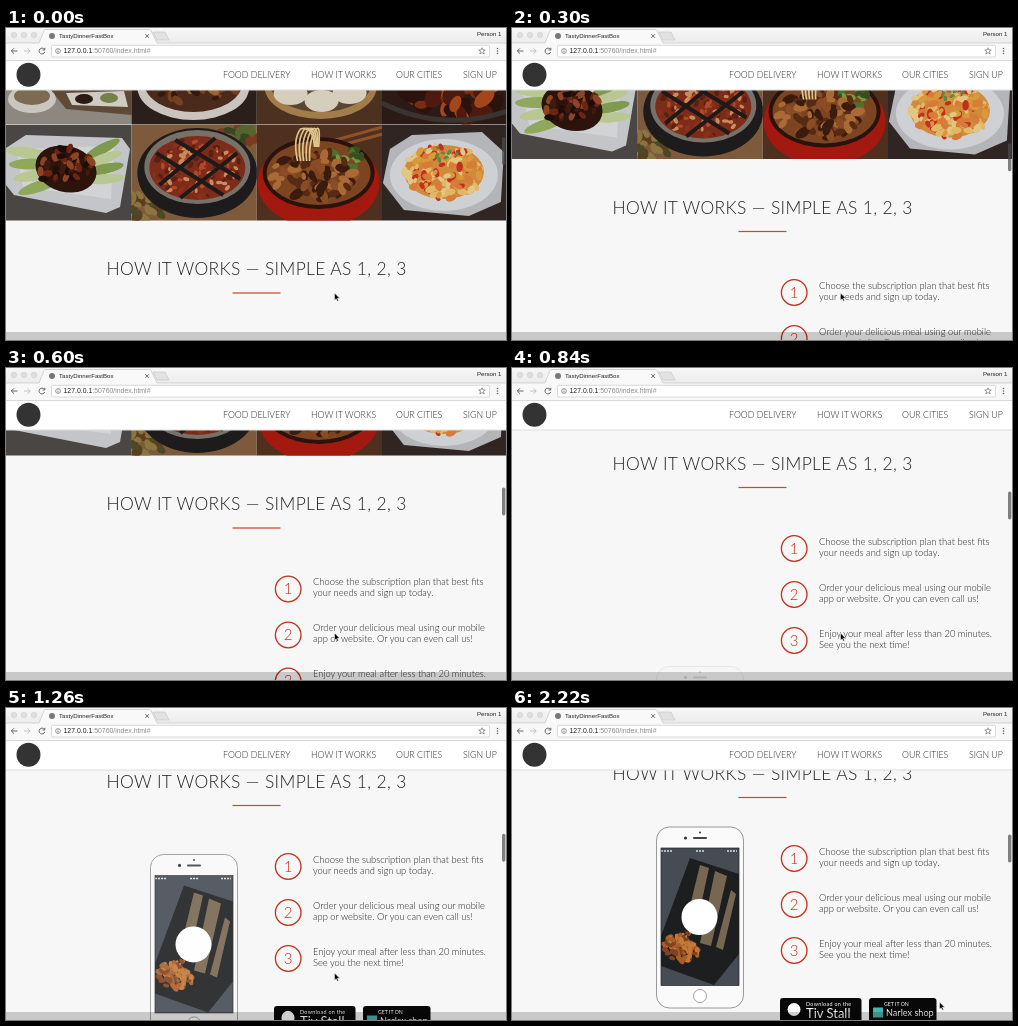
An HTML page that plays this animation: 500x312 px, repeating every 2.28 s.

```html
<!DOCTYPE html>
<html lang="en">
<head>
<meta charset="utf-8">
<title>Food delivery page</title>
<style>
html, body { margin: 0; width: 100%; height: 100%; overflow: hidden; background: #f7f7f7; }
svg { display: block; width: 100vw; height: 100vh; }
text { font-family: Lato, sans-serif; font-weight: 300; fill: #222; white-space: pre; }
.ui text { font-family: "Liberation Sans", Arial, sans-serif; font-weight: 400; }
.nav { font-size: 8.75px; }
.title { font-size: 17.4px; letter-spacing: .38px; text-anchor: middle; }
.copy { font-size: 9.35px; }
.num { font-size: 15px; text-anchor: middle; fill: #c0301a; }
.badge text { fill: #fff; font-weight: 400; }
</style>
</head>
<body>
<svg viewBox="0 0 500 312">
  <defs>
    <clipPath id="cell"><rect width="125.5" height="95.5"/></clipPath>
    <clipPath id="screen"><rect x="149" y="140" width="78" height="137.5"/></clipPath>
    <linearGradient id="tabs" x2="0" y2="1"><stop stop-color="#f6f6f6"/><stop offset="1" stop-color="#ebebeb"/></linearGradient>
  </defs>

  <g id="page">
    <g id="photos"></g>
    <text class="title" x="250.7" y="247">HOW IT WORKS — SIMPLE AS 1, 2, 3</text>
    <rect x="226.5" y="264.4" width="48" height="1.2" fill="#d0452c"/>
    <g id="steps"></g>
    <g class="badge">
      <rect x="268" y="465.5" width="81.5" height="24" rx="3" fill="#080808"/>
      <circle cx="282" cy="477" r="6.5" fill="#fff"/>
      <text x="294" y="473.5" font-size="5.4" letter-spacing=".3">Download on the</text>
      <text x="294" y="485" font-size="13">Tiv Stall</text>
      <rect x="357" y="465.5" width="67.5" height="24" rx="3" fill="#080808"/>
      <rect x="361" y="475" width="10" height="10" fill="#45b5b0"/>
      <text x="372" y="473" font-size="5.2">GET IT ON</text>
      <text x="374" y="483.5" font-size="9.1">Narlex shop</text>
    </g>
    <g id="phone">
      <rect x="144.5" y="119" width="87" height="181" rx="13" fill="#fafafa" stroke="#999"/>
      <circle cx="188" cy="124.5" r="1" fill="#333"/>
      <circle cx="173.5" cy="130" r="1.6" fill="#333"/>
      <rect x="181" y="129" width="14" height="2" rx="1" fill="#444"/>
      <circle cx="188" cy="288" r="6.5" fill="#fff" stroke="#888" stroke-width=".8"/>
      <g clip-path="url(#screen)">
        <rect x="149" y="140" width="78" height="138" fill="#464b54"/>
        <path d="M178 150L227 166V246L202 277L149 258V228Z" fill="#1d1e20"/>
        <path d="M188 157L197 160L187 206L177 202ZM203 163L215 168L199 238L188 235ZM219 182L224 186L211 242L204 239Z" fill="#776650"/>
        <g id="rice"></g>
        <path d="M149 143H160M184 143H193M215 143H225" stroke="#ddd" stroke-width="1.5" stroke-dasharray="2 1"/>
        <circle cx="187.5" cy="209" r="18" fill="#fff"/>
      </g>
      <rect x="149" y="140" width="78" height="137.5" fill="none" stroke="#222" stroke-width=".7"/>
    </g>
  </g>

  <rect id="thumb" x="496" width="3.4" height="28" rx="1.7" fill="#4c4c4c" opacity=".7"/>
  <rect y="304" width="500" height="8" fill="#000" opacity=".19"/>

  <rect y="32" width="500" height="30" fill="#fff"/>
  <rect y="61.5" width="500" height="1" fill="#ddd"/>
  <circle cx="22.5" cy="46.8" r="12" fill="#333"/>
  <g class="nav">
    <text x="217" y="50">FOOD DELIVERY</text>
    <text x="305" y="50">HOW IT WORKS</text>
    <text x="390" y="50">OUR CITIES</text>
    <text x="457" y="50">SIGN UP</text>
  </g>

  <g class="ui">
    <rect width="500" height="16" fill="url(#tabs)"/>
    <g fill="#dedede" stroke="#ccc" stroke-width=".5">
      <circle cx="8" cy="7" r="2.8"/><circle cx="18" cy="7" r="2.8"/><circle cx="28" cy="7" r="2.8"/>
    </g>
    <rect y="15" width="500" height="17.5" fill="#f8f8f8"/>
    <path d="M0 15H33L38 2.5Q38.5 1.5 40 1.5H143Q144.5 1.5 145 2.5L151 15H500" fill="#f9f9f9" stroke="#c4c4c4" stroke-width=".7"/>
    <path d="M147 4H159L163 12H151Z" fill="#e2e2e2" stroke="#c4c4c4" stroke-width=".6"/>
    <circle cx="46" cy="8" r="3" fill="#777"/>
    <text x="53" y="10" font-size="6.1">TastyDinnerFastBox</text>
    <path d="M139.3 6.2L143 9.9M143 6.2L139.3 9.9" stroke="#444" stroke-width=".8"/>
    <text x="471" y="8.2" font-size="6.1">Person 1</text>
    <rect x="45.5" y="17.3" width="438" height="11.7" rx="1.5" fill="#fff" stroke="#ccc" stroke-width=".7"/>
    <g fill="none" stroke="#555" stroke-width=".9">
      <path d="M11.5 23H5.5M8 20.3L5.3 23L8 25.7"/>
      <path d="M18 23H24M21.5 20.3L24.2 23L21.5 25.7" stroke="#bbb"/>
      <path d="M38.3 21.3A2.9 2.9 0 1 0 38.7 24M38.8 19.8V22H36.6"/>
      <circle cx="52" cy="23" r="2.4" stroke-width=".6"/>
      <path d="M52 22.5V24.5M52 21.3V21.9" stroke-width=".7"/>
      <path d="M476 19.8L477 22H479.3L477.5 23.5L478.2 25.9L476 24.5L473.8 25.9L474.5 23.5L472.7 22H475Z" stroke-width=".6"/>
    </g>
    <text x="57.5" y="25.3" font-size="6.9">127.0.0.1<tspan fill="#8a8a8a">:50760/index.html#</tspan></text>
    <g fill="#666"><circle cx="491.5" cy="20.5" r=".8"/><circle cx="491.5" cy="23" r=".8"/><circle cx="491.5" cy="25.5" r=".8"/></g>
    <path d="M0 32.5H500" stroke="#ccc" stroke-width=".7"/>
  </g>

  <path id="cursor" d="M0 0V7.2L1.7 5.7L2.8 8.2L4 7.7L2.9 5.3H5.2Z" fill="#000" stroke="#fff" stroke-width=".5"/>
</svg>
<script>
const $ = id => document.getElementById(id);
let seed = 7;
const rnd = () => (seed = seed * 16807 % 2147483647) / 2147483647;

const oval = (x, y, rx, ry, fill, turn = 0) =>
  `<ellipse cx="${x}" cy="${y}" rx="${rx}" ry="${ry}" fill="${fill}" transform="rotate(${turn} ${x} ${y})"/>`;
const shape = (d, fill) => `<path d="${d}" fill="${fill}"/>`;
const line = (d, color, width) => `<path d="${d}" fill="none" stroke="${color}" stroke-width="${width}"/>`;

// Scatter small pieces of food inside an ellipse
function bits(x, y, rx, ry, count, size, colors) {
  let out = '';
  for (let i = 0; i < count; i++) {
    const a = rnd() * 6.283, r = Math.sqrt(rnd()), s = size * (.6 + rnd() * .7);
    out += oval(x + Math.cos(a) * r * rx, y + Math.sin(a) * r * ry, s, s * .6,
      colors[i % colors.length], rnd() * 180);
  }
  return out;
}

function photo(col, row, back, art) {
  return `<g transform="translate(${col * 125.3} ${1 + row * 96})" clip-path="url(#cell)">
    <rect width="126" height="96" fill="${back}"/>${art}</g>`;
}

const greens = [0, 1, 2, 3].map(i =>
  oval(22 + i * 4, 28 + i * 11, 23, 5.5, i % 2 ? '#8fa85c' : '#b9c792', 8 - i * 9) +
  oval(96 + i, 24 + i * 10, 20, 5, i % 2 ? '#b9c792' : '#7d9a4e', -28 + i * 8)).join('');

$('photos').innerHTML =
  photo(0, 0, '#8c8781',
    shape('M44 60H126V86L60 80Z', '#5f4a38') + shape('M60 64L118 62L122 78L66 76Z', '#d0ccc4') +
    oval(78, 70, 9, 5, '#2b1b14') + oval(103, 69, 9, 5, '#75804a') +
    oval(26, 70, 24, 14, '#c9c6c0') + oval(26, 67, 18, 9, '#7c6a52')) +
  photo(1, 0, '#2a1f1a',
    oval(62, 58, 56, 33, '#c9c4bd') + oval(62, 54, 49, 29, '#4a2a1a') +
    bits(62, 62, 43, 15, 30, 6, ['#74401f', '#9a6636', '#35190f'])) +
  photo(2, 0, '#4c3020',
    oval(64, 58, 56, 32, '#a37c4c') + oval(64, 56, 50, 27, '#594632') +
    [[34, 65], [65, 72], [93, 64]].map(([x, y]) => oval(x, y, 17, 11, '#d6cebd')).join('')) +
  photo(3, 0, '#2b1a15',
    bits(66, 70, 56, 20, 34, 11, ['#7b2a13', '#4c1a0e', '#a4461c', '#2c120c']) +
    line('M0 74Q60 104 126 82', '#3a3431', 5)) +
  photo(0, 1, '#4a4644',
    shape('M0 23L20 10L116 13L124 24L114 82L100 88L8 70L0 60Z', '#c4c5c8') +
    shape('M10 24L108 21L105 74L17 62Z', '#d2d3d4') + greens +
    oval(60, 44, 31, 23, '#2c140d', 15) +
    bits(60, 43, 29, 20, 46, 4.5, ['#1c0d09', '#6d2414', '#40190f', '#8c4425'])) +
  photo(1, 1, '#7d5a3c',
    bits(14, 82, 22, 14, 26, 6, ['#4c4a22', '#8b7440', '#5c3d20']) +
    bits(108, 12, 20, 12, 24, 6, ['#54652f', '#7b3a20', '#3a4522']) +
    oval(66, 48, 60, 45, '#1d1b1b') + oval(66, 42, 53, 37, '#77716a') + oval(66, 43, 48, 32, '#7c2c18') +
    bits(66, 43, 45, 29, 110, 3, ['#b5472a', '#5a2013', '#c98a5c', '#8c2f1c']) +
    line('M25 28L92 70M44 15L109 54M28 60L84 13M49 73L106 28', '#1f1a19', 4)) +
  photo(2, 1, '#4f2f1e',
    line('M72 17L126 2M78 22L126 9', '#8f5228', 3) +
    oval(62, 58, 61, 44, '#a3180f') + oval(62, 48, 56, 36, '#2a120d') + oval(62, 48, 52, 32, '#7c4522') +
    bits(91, 33, 17, 13, 18, 5, ['#4d702c', '#7c963f', '#35501f']) +
    bits(57, 51, 42, 24, 80, 6, ['#562a14', '#8a4c24', '#a96a36', '#3a1b0e']) +
    [0, 1, 2, 3, 4].map(i => line(`M${41 + i * 3} 36Q${36 + i * 4} 14 ${44 + i * 4} 4Q${56 + i * 2} 0 ${58 + i} 22`, '#dfc58a', 1.7)).join('')) +
  photo(3, 1, '#2f2522',
    shape('M8 24L30 10L100 7L122 27L119 77L87 91L22 85L1 58Z', '#b4b5b9') + oval(62, 50, 54, 36, '#cfd0d4') +
    oval(62, 47, 40, 27, '#cf8a3c') +
    bits(62, 47, 40, 27, 120, 4.5, ['#d99a3c', '#e0b866', '#c0301c', '#d87a38', '#e2c684']) +
    bits(60, 30, 18, 8, 9, 2.5, ['#648345']));

$('rice').innerHTML = bits(170, 239, 17, 15, 75, 3.5, ['#a95d2b', '#c37937', '#80421f']);

const copy = [
  ['Choose the subscription plan that best fits', 'your needs and sign up today.'],
  ['Order your delicious meal using our mobile', 'app or website. Or you can even call us!'],
  ['Enjoy your meal after less than 20 minutes.', 'See you the next time!']
];
$('steps').innerHTML = copy.map(([a, b], i) => {
  const y = 326 + i * 46;
  return `<circle cx="282.2" cy="${y}" r="12.8" fill="none" stroke="#c0301a" stroke-width="1.3"/>
    <text class="num" x="282.2" y="${y + 5.2}">${i + 1}</text>
    <text class="copy" x="307" y="${y - 4}">${a}</text>
    <text class="copy" x="307" y="${y + 7}">${b}</text>`;
}).join('');

const LOOP = 2280, STEP = 60;
const clamp = x => Math.min(1, Math.max(0, x));
const smooth = x => x * x * (3 - 2 * x);

// Time, scroll distance, speed
const path = [[0, 0, .2], [300, 61.5, .17], [600, 105, .155], [840, 145.5, .1], [1260, 167.5, .03], [1620, 175.5, 0]];
function scrollAt(t) {
  const i = path.findIndex(p => p[0] > t);
  if (i < 0) return 175.5;
  const [t0, a, va] = path[i - 1], [t1, b, vb] = path[i];
  const d = t1 - t0, u = (t - t0) / d, w = 1 - u;
  return a * w * w * (1 + 2 * u) + b * u * u * (3 - 2 * u) + d * u * w * (va * w - vb * u);
}

// CSS "ease" curve, cubic-bezier(.25, .1, .25, 1)
function ease(x) {
  let lo = 0, hi = 1;
  for (let i = 0; i < 20; i++) {
    const m = (lo + hi) / 2;
    if (.75 * m * (1 - m) + m ** 3 < x) lo = m; else hi = m;
  }
  return .3 * lo * (1 - lo) ** 2 + 3 * lo * lo * (1 - lo) + lo ** 3;
}

function draw(now) {
  const t = Math.floor(now % LOOP / STEP) * STEP;
  const s = scrollAt(t), rise = ease(clamp((t - 710) / 900)), move = smooth(clamp((t - 1740) / 360));
  $('page').setAttribute('transform', `translate(0 ${-s})`);
  $('phone').setAttribute('transform', `translate(0 ${175.5 + 181 * (1 - rise)})`);
  $('phone').setAttribute('opacity', rise);
  $('thumb').setAttribute('y', 109 + s * .1);
  $('cursor').setAttribute('transform', `translate(${328.5 + 99 * move} ${265 + 29 * move})`);
  requestAnimationFrame(draw);
}
draw(0);
</script>
</body>
</html>
```
